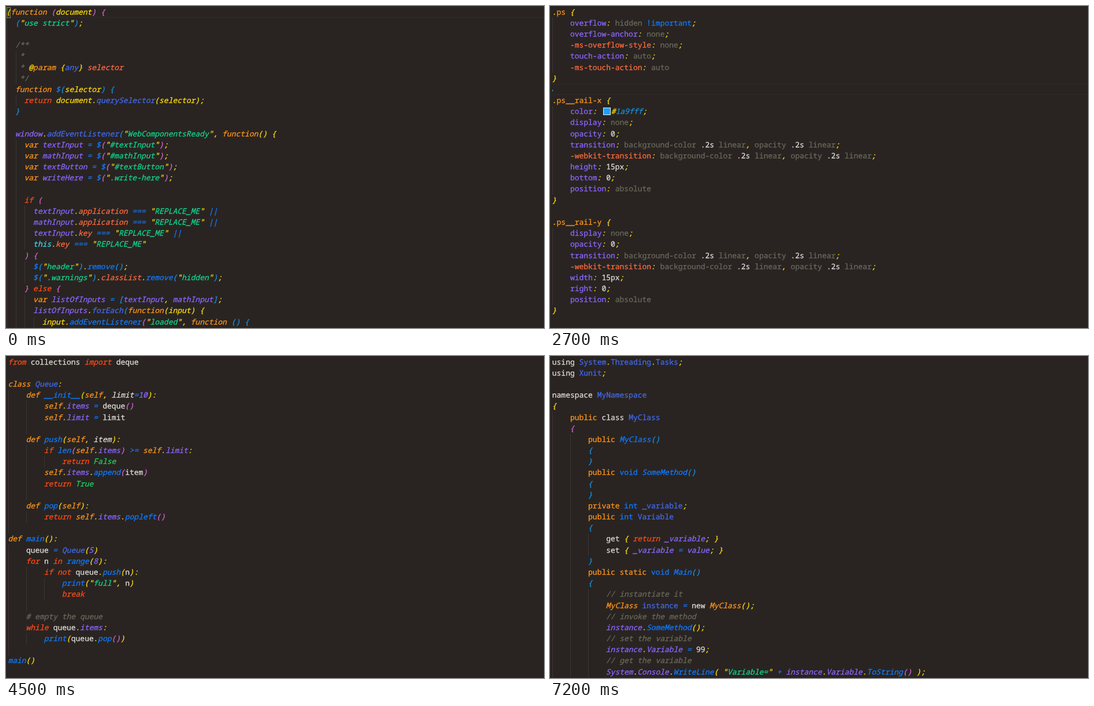
An HTML page that plays this animation: 931 by 558 pixels, repeating every 8000 ms.

```html
<!DOCTYPE html>
<html lang="en">
<head>
<meta charset="utf-8">
<title>Code themes</title>
<style>
html, body { margin: 0; width: 100%; height: 100%; overflow: hidden; background: #292422; }
.page { position: absolute; left: 0; top: 0; width: 931px; height: 558px; overflow: hidden; visibility: hidden; }
.page * { position: absolute; box-sizing: border-box; }
.page span {
  white-space: pre; font: 12.975px/19px "Noto Sans Mono", monospace;
  text-rendering: geometricPrecision; -webkit-text-stroke: .3px currentColor;
}
.guide { width: 1px; background: #3a3633; }
.line { left: 0; width: 931px; height: 19px; border: solid #2e2b2c; border-width: 1px 0; }
.match { width: 7px; height: 19px; border: 1px solid #80884a; background: #27301f; }
.cursor { width: 1px; background: #16c98d; }
.swatch { width: 13px; height: 13px; border: 1px solid #eee; background: #1a9fff; }
</style>
</head>
<body>
<script>
const CELL = 7.785, ROW = 19.18, HOLD = 900, LOOP = 8000;

// Lower case is italic, upper case is upright.
const COLORS = {
  o: '#ff9419', r: '#ff4a16', s: '#ff6a3d', y: '#ffdc0a', g: '#10d68b', p: '#8c66ff', b: '#0f7aff',
  c: '#1590dc', k: '#d95fd0', w: '#dedbd6', m: '#68695a', i: '#4169ec', t: '#38d5ee', n: '#18d45c'
};

// ~x sets a colour, ~50 jumps to a column; quotes and . , ; stay yellow.
const PAGES = [
{ x: 1, tab: 2, active: 0, match: true, code: String.raw`
~y(~ofunction ~k(~ydocument~k) {
  ~c("use strict"~c);

  ~m/**
   ~m*
   ~m* ~y@~oparam ~y{~iany~y} ~sselector
   ~m*/
  ~ofunction ~b$~c(~yselector~c) {
    ~rreturn ~ydocument.~iquerySelector~y(selector);
  ~c}

  ~pwindow.~iaddEventListener~c("WebComponentsReady", ~ofunction~y() {
    ~ovar ~ptextInput ~b= $~k("#textInput"~k);
    ~ovar ~pmathInput ~b= $~k("#mathInput"~k);
    ~ovar ~ptextButton ~b= $~k("#textButton"~k);
    ~ovar ~pwriteHere ~b= $~k(".write-here"~k);

    ~rif ~k(
      ~ptextInput.~sapplication ~b=== "REPLACE_ME" ||
      ~pmathInput.~sapplication ~b=== "REPLACE_ME" ||
      ~ptextInput.~skey ~b=== "REPLACE_ME" ||
      ~tthis.~skey ~b=== "REPLACE_ME"
    ~k) {
      ~b$~c("header"~c).~bremove~c();
      ~b$~c(".warnings"~c).~sclassList.~bremove~c("hidden");
    ~k} ~relse ~k{
      ~ovar ~plistOfInputs ~b= ~c[~ptextInput, mathInput~c];
      ~plistOfInputs.~iforEach~c(~ofunction~y(input) {
        input.~baddEventListener~k("loaded", ~ofunction ~c() {` },

{ x: 1, tab: 2, active: 3, match: true, code: String.raw`
{
  "~c_from": "@kalpa/request-handler@^0.0.3",
  "~c_id": "@kalpa/request-handler@0.0.3",
  "~c_inBundle": ~nfalse,
  "~c_location": "/@kalpa/request-handler",
  "~c_phantomChildren": ~k{},
  "~c_requested": ~k{
    "~otype": "range",
    "~oregistry": ~ntrue,
    "~oraw": "@kalpa/request-handler@^0.0.3",
    "~oname": "@kalpa/request-handler",
    "~oscope": "@kalpa",
    "~orawSpec": "^0.0.3",
    "~osaveSpec": ~nnull,
    "~ofetchSpec": "^0.0.3"
  ~k},
  "~c_requiredBy": ~k[
    "/kalpa"
  ~k],
  "~oava": ~k{
    "~ocompileEnhancements": ~ntrue,
    "~oextensions": ~c[
      "ts"
    ~c],
    "~ofiles": ~c[
      "test/**/*.ts",
      "!test/lib"
    ~c],
    "~orequire": ~c[` },

{ x: 4, tab: 2, code: String.raw`
~m<!~rDOCTYPE ~ohtml~m>
~m<~rhtml ~olang~b="en"~m>
  ~m<~rhead~m>
    ~m<~rmeta ~ocharset~b="utf-8"~m>
    ~m<~rtitle~m>~WSample~m</~rtitle~m>
    ~m<~rlink ~orel~b="stylesheet" ~ohref~b="style.css"~m>
  ~m</~rhead~m>

  ~m<~rbody~m>
    ~m<~rheader ~oclass~b="top"~m>
      ~m<~rh1~m>~WSample~m</~rh1~m>
    ~m</~rheader~m>

    ~m<~rul ~oid~b="list"~m>
      ~m<~rli~m>~Wfirst~m</~rli~m>
      ~m<~rli~m>~Wsecond~m</~rli~m>
      ~m<~rli~m>~Wthird~m</~rli~m>
    ~m</~rul~m>

    ~m<~rform ~oaction~b="/send" ~omethod~b="post"~m>
      ~m<~rinput ~otype~b="text" ~oname~b="title"~m>
      ~m<~rbutton ~otype~b="submit"~m>~WSend~m</~rbutton~m>
    ~m</~rform~m>
  ~m</~rbody~m>
~m</~rhtml~m>` },

{ x: 4, tab: 4, active: 7, cursor: [145, 3], code: String.raw`
.~Ops ~y{
    ~Poverflow~y: ~Mhidden ~B!important;
    ~Poverflow-anchor~y: ~Mnone;
    ~S-ms-overflow-style~y: ~Mnone;
    ~Ptouch-action~y: ~Mauto;
    ~S-ms-touch-action~y: ~Mauto
}

.~Ops__rail-x ~y{
    ~Pcolor~y: □#~c1a9fff;
    ~Pdisplay~y: ~Mnone;
    ~Popacity~y: ~W0;
    ~Ptransition~y: ~Mbackground-color ~W.2s ~Mlinear, opacity ~W.2s ~Mlinear;
    ~S-webkit-transition~y: ~Mbackground-color ~W.2s ~Mlinear, opacity ~W.2s ~Mlinear;
    ~Pheight~y: ~W15px;
    ~Pbottom~y: ~W0;
    ~Pposition~y: ~Mabsolute
}

.~Ops__rail-y ~y{
    ~Pdisplay~y: ~Mnone;
    ~Popacity~y: ~W0;
    ~Ptransition~y: ~Mbackground-color ~W.2s ~Mlinear, opacity ~W.2s ~Mlinear;
    ~S-webkit-transition~y: ~Mbackground-color ~W.2s ~Mlinear, opacity ~W.2s ~Mlinear;
    ~Pwidth~y: ~W15px;
    ~Pright~y: ~W0;
    ~Pposition~y: ~Mabsolute
}` },

{ x: 4, tab: 2, active: 0, cursor: [2, 17], quote: 'g', code: String.raw`
~ovoid ~bmain~y() {

  ~oMap~b<~oString, int~b> ~wcountryDialingCode ~b= ~k{~50~m// Method 1: Using Literal
    "USA"~b: ~p1,
    "INDIA"~b: ~p91,
    "PAKISTAN"~b: ~p92
  ~k};

  ~oMap~b<~oString, String~b> ~wfruits ~b= ~oMap~k();~50~m// Method 2: Using Constructor
  ~wfruits~k["apple"] ~b= "red";
  ~wfruits~k["banana"] ~b= "yellow";
  ~wfruits~k["guava"]  ~b= "green";

  ~wfruits.~bcontainsKey~k("apple");~54~m// returns true if the KEY is present in Map
  ~wfruits.~bupdate~k("apple", ~c(~wvalue~c) ~b=> "green"~k);~54~m// Update the VALUE for the given KEY
  ~wfruits.~bremove~k("apple");~54~m// removes KEY and it's VALUE and returns the VALUE

  ~bprint~k(~wfruits~c["apple"]~k);

  ~rfor ~k(~oString ~wkey ~rin ~wfruits.keys~k) {~46~m// Print all keys
    ~bprint~c(~wkey~c);
  ~k}
  ~bprint~k("~w\n");

  ~rfor ~k(~oString ~wvalue ~rin ~wfruits.values~k) {~50~m// Print all values
    ~bprint~c(~wvalue~c);
  ~k}

  ~bprint~k("~w\n");` },

{ x: 4, tab: 4, code: String.raw`
~rfrom ~Wcollections ~rimport ~Wdeque

~oclass ~iQueue~y:
    ~odef ~b__init__~y(~oself, ~wlimit~b=~p10~y):
        ~oself.~pitems ~b= ~Wdeque~k()
        ~oself.~plimit ~b= ~Wlimit

    ~odef ~bpush~y(~oself, ~witem~y):
        ~rif ~blen~k(~oself.~pitems~k) ~b>= ~oself.~plimit~y:
            ~rreturn ~nFalse
        ~oself.~pitems.~bappend~k(~Witem~k)
        ~rreturn ~nTrue

    ~odef ~bpop~y(~oself~y):
        ~rreturn ~oself.~pitems.~bpopleft~k()

~odef ~bmain~y():
    ~Wqueue ~b= ~iQueue~y(~p5~y)
    ~rfor ~Wn ~rin ~brange~y(~p8~y):
        ~rif ~rnot ~Wqueue.~bpush~y(~Wn~y):
            ~bprint~y("full", ~Wn~y)
            ~rbreak

    ~m# empty the queue
    ~rwhile ~Wqueue.~pitems~y:
        ~bprint~y(~Wqueue.~bpop~k()~y)

~bmain~y()` },

{ x: 4, tab: 4, active: 1, code: String.raw`
~Bimport "~ifmt"

~Bfunc ~iaccumulator~y(~Wsum ~Binterface~k{}~y) ~Bfunc~y(~Binterface~k{}~y) ~Binterface~y{} {
    ~rreturn ~Bfunc~k(~Wnv ~Binterface~c{}~k) ~Binterface~k{} {
        ~rswitch ~is ~b:= ~Wsum.~c(~Wtype~c) {
        ~rcase ~oint~y:
            ~rswitch ~in ~b:= ~Wnv.~y(~Wtype~y) {
            ~rcase ~oint~y:
                ~psum ~b= ~Ws ~b+ ~Wn
            ~rcase ~ofloat64~y:
                ~psum ~b= ~Pfloat64~k(~Ws~k) ~b+ ~Wn
            ~y}
        ~rcase ~ofloat64~y:
            ~rswitch ~in ~b:= ~Wnv.~y(~Wtype~y) {
            ~rcase ~oint~y:
                ~psum ~b= ~Ws ~b+ ~Pfloat64~k(~Wn~k)
            ~rcase ~ofloat64~y:
                ~psum ~b= ~Ws ~b+ ~Wn
            ~y}
        ~rdefault~y:
            ~psum ~b= ~Wnv
        ~c}
        ~rreturn ~Wsum
    ~k}
}

~Bfunc ~imain~y() {
    ~px ~b:= ~Paccumulator~k(~W1~k)
    ~Px~k(~W5~k)` },

{ x: 4, tab: 4, code: String.raw`
~Oimport ~Ijava.util.ArrayList;
~Oimport ~Ijava.util.List;

~Opublic ~Wclass ~ICounter ~y{
    ~Oprivate ~Bint ~Icount;
    ~Oprivate ~oList~b<~oString~b> ~Inames ~b= ~Wnew ~oArrayList~b<>~k();

    ~Opublic ~iCounter~k(~Bint ~Wstart~k) {
        ~tthis.~pcount ~b= ~Wstart;
    ~k}

    ~Opublic ~Bvoid ~iadd~k(~oString ~Wname~k) {
        ~m// keep each name once
        ~rif ~c(~b!~pnames.~bcontains~y(~Wname~y)~c) {
            ~pnames.~badd~y(~Wname~y);
            ~pcount~b++;
        ~c}
    ~k}

    ~Opublic static ~Bvoid ~imain~k(~oString~c[] ~Wargs~k) {
        ~oCounter ~Icounter ~b= ~Wnew ~oCounter~c(~W0~c);
        ~pcounter.~badd~c("one");
        ~pcounter.~badd~c("two");
        ~pSystem.out.~bprintln~c(~pcounter.count~c);
    ~k}
}` },

{ x: 4, tab: 4, code: String.raw`
~Wusing ~ISystem.Threading.Tasks;
~Wusing ~IXunit;

~Wnamespace ~IMyNamespace
{
    ~Opublic ~Wclass ~IMyClass
    ~k{
        ~Opublic ~bMyClass~c()
        ~c{
        ~c}
        ~Opublic ~Bvoid ~bSomeMethod~c()
        ~c{
        ~c}
        ~Oprivate ~Bint ~I_variable;
        ~Opublic ~Bint ~IVariable
        ~c{
            ~Wget ~y{ ~rreturn ~p_variable; ~y}
            ~Wset ~y{ ~p_variable ~b= ~pvalue; ~y}
        ~c}
        ~Opublic static ~Bvoid ~bMain~c()
        ~c{
            ~m// instantiate it
            ~oMyClass ~Iinstance ~b= ~Wnew ~oMyClass~y();
            ~m// invoke the method
            ~pinstance.~bSomeMethod~y();
            ~m// set the variable
            ~pinstance.Variable ~b= ~W99;
            ~m// get the variable
            ~pSystem.Console.~bWriteLine~y( "Variable=" ~b+ ~pinstance.Variable.~bToString~k() ~y);` }
];

const TOKEN = /~(\d+)|~(\w)|"(?:~(\w))?([^"]*)"|□|[.,;](?!\d)|(?:[^~".,;□]|[.](?=\d))+/g;

function add(parent, tag, cls, style) {
  const el = parent.appendChild(document.createElement(tag));
  el.className = cls;
  for (const key in style) {
    const v = style[key];
    el.style[key] = typeof v === 'number' ? v + 'px' : v;
  }
  return el;
}

function drawLine(el, page, line, row) {
  let col = 0, color = 'y';
  const top = Math.round(row * ROW + .6);
  const put = (text, key) => {
    const italic = key === key.toLowerCase();
    if (text.trim()) add(el, 'span', '', {
      left: page.x + col * CELL - (italic ? .6 : .2), top,
      color: COLORS[key.toLowerCase()],
      fontStyle: italic ? 'italic' : 'normal'
    }).textContent = text;
    col += text.length;
  };
  for (const [text, jump, key, inner, str] of line.matchAll(TOKEN)) {
    if (jump) col = +jump;
    else if (key) color = key;
    else if (str !== undefined) {
      const quote = page.quote || 'y';
      put('"', quote);
      put(str, inner || 'g');
      put('"', quote);
    } else if (text === '□') {
      add(el, 'i', 'swatch', { left: page.x + col * CELL + 2, top: top + 3 });
      col += 2.15;
    } else put(text, /^[.,;]$/.test(text) ? 'y' : color);
  }
}

function guideCounts(lines, tab) {
  const indent = lines.map(l => l ? l.search(/\S/) : -1);
  return indent.map((n, i) => {
    if (n >= 0) return Math.ceil(n / tab);
    const a = indent[i - 1], b = indent[i + 1];
    return a === b ? Math.ceil(a / tab) : 1 + Math.floor(Math.min(a, b) / tab);
  });
}

function build(page) {
  const el = add(document.body, 'div', 'page');
  const lines = page.code.slice(1).split('\n');
  const rowTop = row => Math.round(1 + row * ROW);
  if (page.active !== undefined) add(el, 'i', 'line', { top: rowTop(page.active) });
  guideCounts(lines, page.tab).forEach((count, row) => {
    for (let n = 0; n < count; n++) add(el, 'i', 'guide', {
      left: Math.round(page.x + n * page.tab * CELL),
      top: rowTop(row), height: rowTop(row + 1) - rowTop(row)
    });
  });
  if (page.match) add(el, 'i', 'match', { left: page.x, top: 2 });
  lines.forEach((line, row) => drawLine(el, page, line, row));
  if (page.cursor) add(el, 'i', 'cursor', { left: 4, top: page.cursor[0], height: page.cursor[1] });
  return el;
}

const views = PAGES.map(build);
const start = performance.now();
let shown = -1;

function tick() {
  const i = Math.floor((performance.now() - start) % LOOP / HOLD);
  if (i !== shown) {
    views.forEach((v, n) => { v.style.visibility = n === i ? 'visible' : 'hidden'; });
    shown = i;
  }
  requestAnimationFrame(tick);
}
tick();
</script>
</body>
</html>
```
